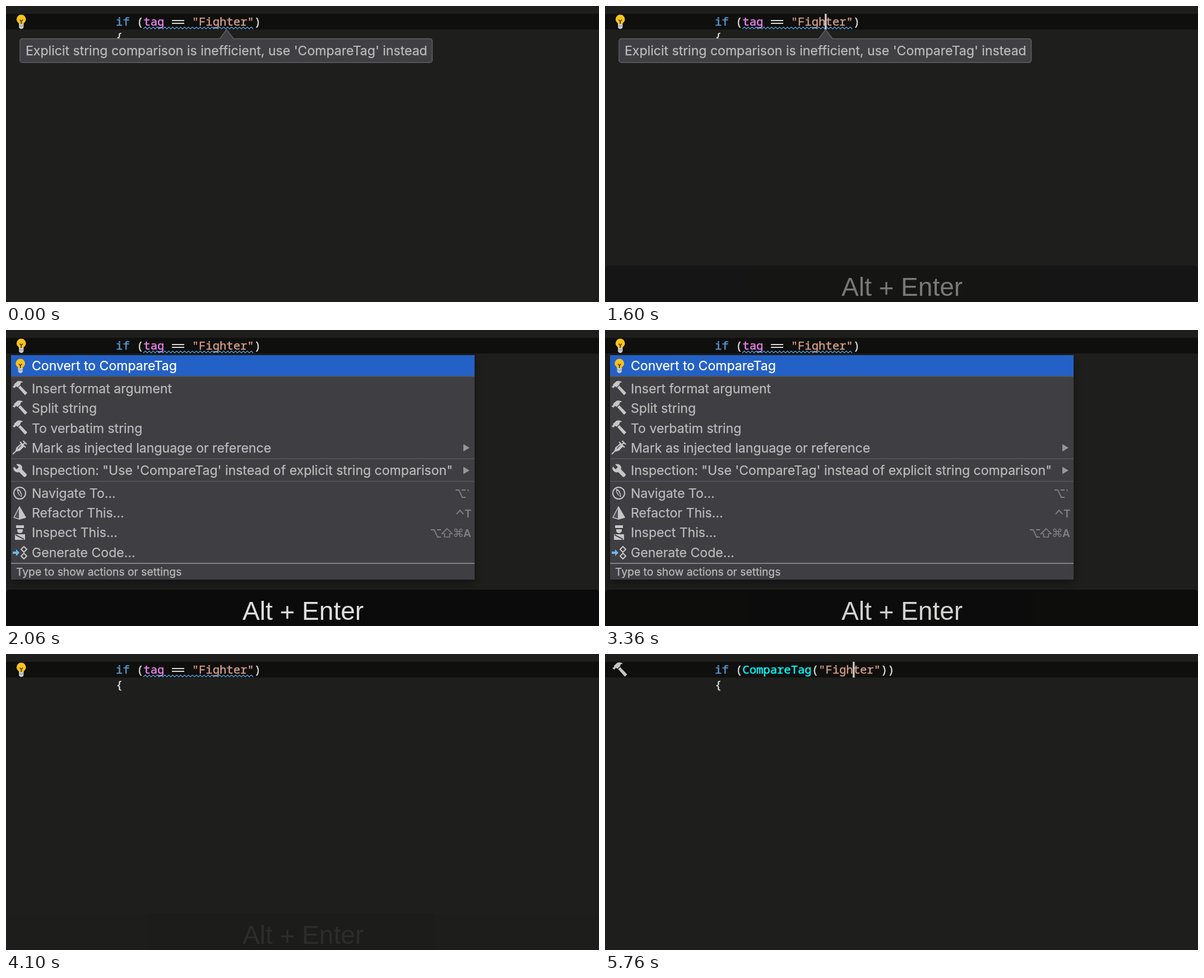
Animation, 1058 px wide and 529 px high, one loop 6 s. Source, as an HTML page:

```html
<!DOCTYPE html>
<html lang="en">
<head>
<meta charset="utf-8">
<title>Quick fix</title>
<style>
  html, body { margin: 0; width: 100%; height: 100%; overflow: hidden; background: #1e1e1d; }
  svg { display: block; width: 1058px; height: 529px; }
  text { white-space: pre; font-optical-sizing: none; }
  text, tspan { fill: currentColor; stroke: currentColor; }
  .code { font: 20.55px "Noto Sans Mono", monospace; color: #dcdcdc; stroke-width: .45; font-variant-ligatures: none; }
  .keyword { color: #569cd6; }
  .field { color: #ee82ee; }
  .string { color: #d69d85; }
  .method { color: #00f5f5; stroke-width: .6; }
  .ui { font: 23.05px Inter, sans-serif; color: #bbb; stroke-width: .25; }
  .small { font-size: 19.3px; }
  .keys { font: 600 19px Inter, sans-serif; color: #808083; stroke: none; }
  .symbol { font: 20px "DejaVu Sans", sans-serif; color: #808083; stroke: none; }
  .hint { font: 46px "Liberation Sans", Arial, sans-serif; color: #fff; stroke-width: 0; }
  #menu { filter: drop-shadow(0 7px 7px rgba(0, 0, 0, .35)); }
</style>
</head>
<body>
<svg viewBox="0 0 1058 529">
  <defs>
    <g id="bulb">
      <path d="M5 16H13.500V22Q13 26 9.200 26T5 22Z" fill="#c9c9c9"/>
      <path d="M5 20.500h8.500" stroke="#8d8d8d"/>
      <path d="M9.200 .500a8.200 8.200 0 0 1 5 14.700L13 17H5.500L4.200 15.200A8.200 8.200 0 0 1 9.200 .500Z" fill="#f9c31c"/>
      <path d="M6.500 9.500l2.700 3 2.700-3M9.200 12v5" fill="none" stroke="#4a3b12" stroke-width="1.700"/>
    </g>
    <g id="hammer" fill="#c6c6c6">
      <path d="M0 10L3 8.500 3 6 9 .500Q14-1 19 2L15 3.500 14 7 9 11.500 6.500 9.500 3.500 13Z"/>
      <path d="M10.500 12L14 8.500 26.500 21.500 22.500 25.500Z"/>
    </g>
    <g id="syringe" fill="none" stroke="#c6c6c6">
      <path d="M0 25L7 18" stroke-width="2"/>
      <path d="M5 20L7 13 15 6 20 11 12.500 18.500Z" fill="#c6c6c6"/>
      <path d="M13 3L23 13M17.500 8.500L22 4M18.500 1L25 7.500" stroke-width="2.200"/>
      <path d="M9 15l3-3m0 0l3-3" stroke="#55555a" stroke-width="1.500"/>
    </g>
    <path id="wrench" fill="#c6c6c6" d="M5 1Q13-1 16 6L15.500 10 24 19Q24 23 19.500 24L10.500 15Q3 17 0 9L1 5 6 10 10 6Z"/>
    <g id="compass">
      <circle cx="12" cy="12" r="10.500" fill="none" stroke="#c6c6c6" stroke-width="2"/>
      <path d="M7 4Q16 6 16 19Q7 16 7 4Z" fill="#c6c6c6"/>
      <path d="M9.500 8L14 16.500" stroke="#3f3f43" stroke-width="2.500"/>
    </g>
    <g id="pyramid" stroke="#c6c6c6" stroke-width="1.500" stroke-linejoin="round">
      <path d="M11 1L1 20 11 23Z" fill="#505055"/>
      <path d="M11 1L22 20 11 23Z" fill="#c6c6c6"/>
    </g>
    <g id="inspector" fill="#c6c6c6">
      <path d="M2 0H16V5H2ZM4 7H14V10Q13 14 9 14T4 10ZM0 16H18V26H0Z"/>
      <path d="M2 6H16M1 17L16 25" stroke="#2f2f33" stroke-width="1.500"/>
    </g>
    <g id="generate">
      <path d="M0 10H6V6L12 12 6 18V14H0Z" fill="#6db9ee"/>
      <path d="M20 1L25 6 20 11 15 6ZM20 13L25 18 20 23 15 18Z" fill="none" stroke="#c6c6c6" stroke-width="2"/>
    </g>
    <path id="option" d="M0 0H6L12 13H18M11 0H18" fill="none" stroke="#808083" stroke-width="1.800"/>
  </defs>

  <rect width="1058" height="529" fill="#1e1e1d"/>
  <rect y="14" width="1058" height="28" fill="#0f0f0e"/>
  <use id="gutterBulb" href="#bulb" x="18" y="15"/>
  <use id="gutterHammer" href="#hammer" x="13" y="15"/>

  <g id="before">
    <text class="code" x="196" y="35"><tspan class="keyword">if</tspan> (<tspan class="field">tag</tspan>    <tspan class="string">"Fighter"</tspan>)</text>
    <path d="M296 26H318M296 31H318" stroke="#dcdcdc" stroke-width="2"/>
    <path id="squiggle" fill="none" stroke="#5fb0ee" stroke-width="1.200"/>
  </g>
  <text id="after" class="code" x="196" y="35"><tspan class="keyword">if</tspan> (<tspan class="method">CompareTag</tspan>(<tspan class="string">"Fighter"</tspan>))</text>
  <text class="code" x="196" y="62">{</text>
  <rect id="caret" y="14" width="3.500" height="28" fill="#c4c4c4"/>

  <g id="tooltip">
    <path d="M29 58.500H381.500L393.500 42 406 58.500H756.500a4 4 0 0 1 4 4V97a4 4 0 0 1-4 4H29a4 4 0 0 1-4-4V62.500a4 4 0 0 1 4-4Z" fill="#404044" stroke="#606063" stroke-width="1.500"/>
    <text class="ui" x="35" y="88">Explicit string comparison is inefficient, use 'CompareTag' instead</text>
  </g>

  <g id="menu">
    <rect x="9" y="45" width="827" height="401" fill="#3f3f43"/>
    <rect x="9" y="45" width="827" height="37" fill="#2461c6"/>
    <path d="M9 83H836M9 230H836M9 270.500H836" stroke="#58585b" stroke-width="1.500"/>
    <path d="M9 417H836" stroke="#97979a" stroke-width="1.500"/>
    <path d="M816 204L827 210.500 816 217ZM816 244.500L827 251 816 257.500Z" fill="#97979a"/>
    <g id="items"></g>
    <text class="ui small" x="18" y="439">Type to show actions or settings</text>
    <use href="#option" x="802" y="286"/>
    <text class="keys" x="821" y="300">`</text>
    <path d="M804 329L810 322 816 329" fill="none" stroke="#808083" stroke-width="2"/>
    <text class="keys" x="818" y="335">T</text>
    <use href="#option" x="758" y="357"/>
    <path d="M787 355L796 364H791.500V370H782.500V364H778Z" fill="none" stroke="#808083" stroke-width="1.700"/>
    <text class="symbol" x="797" y="370">⌘</text>
    <text class="keys" x="816" y="370">A</text>
  </g>

  <g id="hint">
    <rect y="464" width="1058" height="72" rx="6" fill="#000" fill-opacity=".72"/>
    <text class="hint" x="422" y="518">Alt <tspan dy="2">+</tspan><tspan dy="-2"> Enter</tspan></text>
  </g>
</svg>
<script>
  const LOOP = 6000;
  const byId = id => document.getElementById(id);
  const within = (t, from, to) => t >= from && t < to;
  const show = (id, visible) => byId(id).style.display = visible ? '' : 'none';

  // icon, icon x, icon y, label, baseline
  const items = [
    ['bulb', 16.5, 51, 'Convert to CompareTag', 72],
    ['hammer', 11.5, 91, 'Insert format argument', 113],
    ['hammer', 11.5, 126, 'Split string', 148],
    ['hammer', 11.5, 161.5, 'To verbatim string', 183.5],
    ['syringe', 12, 197, 'Mark as injected language or reference', 219],
    ['wrench', 13, 239, 'Inspection: "Use \'CompareTag\' instead of explicit string comparison"', 259],
    ['compass', 12.5, 279.5, 'Navigate To…', 300],
    ['pyramid', 13, 315, 'Refactor This…', 335],
    ['inspector', 16, 349, 'Inspect This…', 370],
    ['generate', 12, 386, 'Generate Code…', 406],
  ];
  byId('items').innerHTML = items.map(([icon, x, y, label, baseline], i) =>
    `<use href="#${icon}" x="${x}" y="${y}"/>
     <text class="ui" x="46" y="${baseline}"${i ? '' : ' style="color:#fff"'}>${label}</text>`).join('');

  let zigzag = 'M245 41';
  for (let i = 1; i <= 56; i++) zigzag += `L${245 + i * 3.5} ${i % 2 ? 37.5 : 41}`;
  byId('squiggle').setAttribute('d', zigzag);

  // The hint fades over one second, updated only at these moments.
  const hundreds = start => Array.from({ length: 7 }, (_, i) => start + i * 100);
  const fadeIn = [1200, ...hundreds(1300), 1930, 1960, 2060, 2130, 2200];
  const fadeOut = [3160, ...hundreds(3260), 3960, 4060, 4100, 4160];
  const lastStep = (steps, t) => steps.filter(s => s <= t).pop();

  function hintOpacity(t) {
    if (t < fadeIn[0]) return 0;
    if (t < fadeOut[0]) return (lastStep(fadeIn, t) - 1200) / 1000;
    return (4160 - lastStep(fadeOut, t)) / 1000;
  }

  function draw() {
    const t = performance.now() % LOOP;
    const fixed = t >= 4200;
    show('before', !fixed);
    show('after', fixed);
    show('gutterBulb', t < 4500);
    show('gutterHammer', t >= 4500);
    show('tooltip', t < 1930);
    show('menu', within(t, 2060, 4100));
    show('caret', within(t, 400, 900) || within(t, 1400, 1900) || within(t, 4260, 5230) || t >= 5760);
    byId('caret').setAttribute('x', fixed ? 442 : 392);
    byId('hint').style.opacity = hintOpacity(t);
    requestAnimationFrame(draw);
  }
  draw();
</script>
</body>
</html>
```
